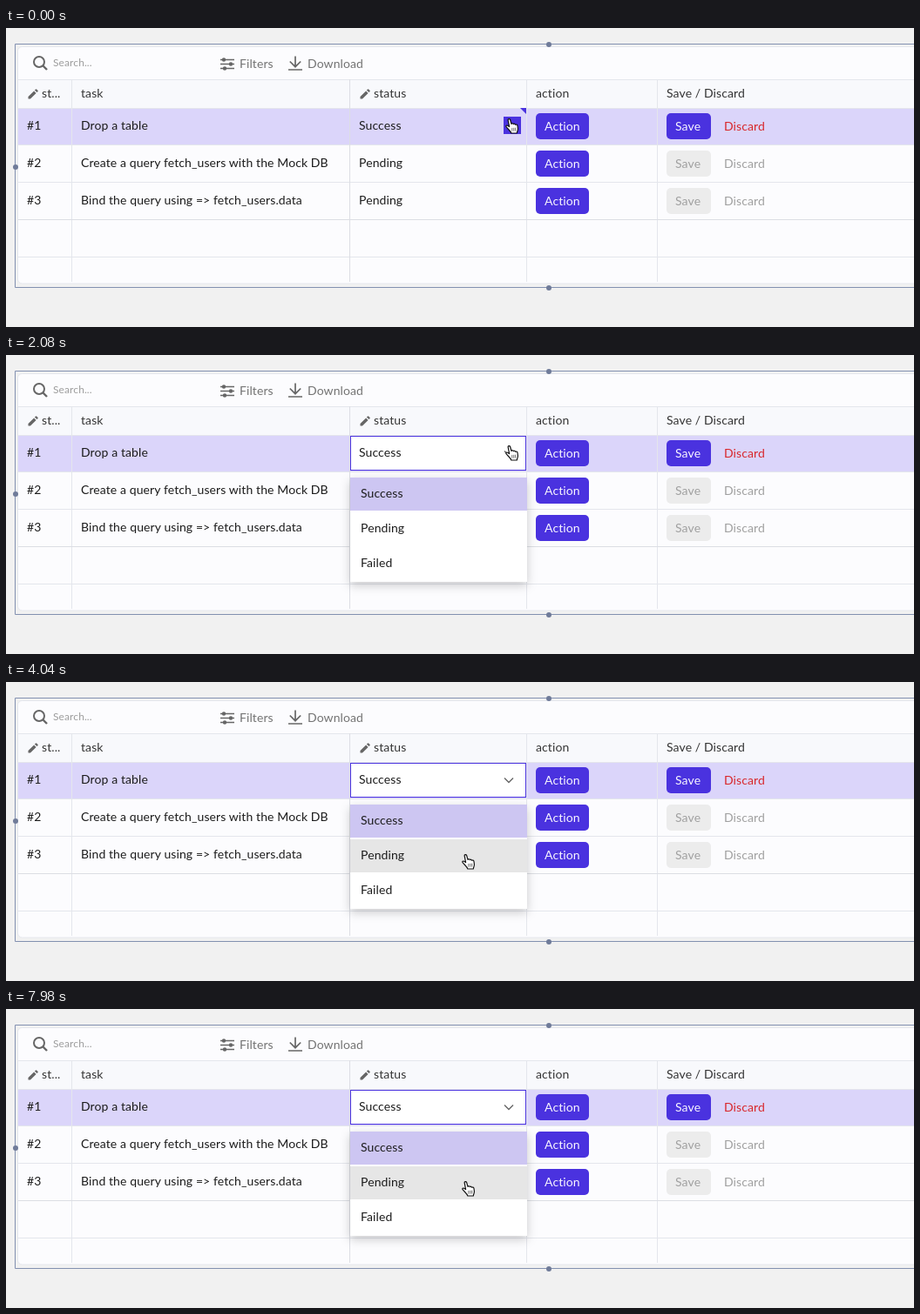
Write an HTML page that moves like this. It is 1042x344 px and loops after 8 s.

```html
<!DOCTYPE html>
<html lang="en">
<head>
<meta charset="utf-8">
<title>Editable table</title>
<style>
  html, body { margin: 0; width: 100%; height: 100%; overflow: hidden; background: #f1f1f1; }
  svg { display: block; width: 1042px; height: 344px; }
  text { font: 14px Lato, "Open Sans", sans-serif; letter-spacing: .1px; fill: #1c1c1c; }
  .head text { fill: #343434; }
  .tools text { fill: #737373; }
  .tools .hint { font-size: 12px; fill: #9c9c9c; }
  .icon { fill: none; stroke: #666; stroke-width: 1.7; }
  .solid { fill: #666; }
  .grid { fill: none; stroke: #e4e6ec; }
  .btn { fill: #4a32df; }
  .label { fill: #f8f6ff; }
  .discard { fill: #d8282c; }
  .off .btn { fill: #ececec; }
  .off text { fill: #a0a0a0; }
  .menu { animation: fade 8s infinite linear; }
  .menu .box { fill: #fff; filter: drop-shadow(0 4px 6px #0003); }
  .edit { animation: edit 8s infinite step-end; }
  .pen { animation: pen 8s infinite step-end; }
  .hover { animation: hover 8s infinite step-end; }
  .hand { animation: move 8s infinite linear; }

  @keyframes pen { 0% { opacity: 1; } 12.75%, 100% { opacity: 0; } }
  @keyframes edit { 0% { opacity: 0; } 12.75%, 100% { opacity: 1; } }
  @keyframes fade { 0%, 13% { opacity: 0; } 16.25%, 100% { opacity: 1; } }
  @keyframes hover { 0% { opacity: 0; } 36.4%, 100% { opacity: 1; } }
  @keyframes move {
    0%, 31% { transform: translate(573px, 104px); animation-timing-function: cubic-bezier(.4, 0, .8, .85); }
    37% { transform: translate(537px, 182px); animation-timing-function: cubic-bezier(.2, .6, .5, 1); }
    41%, 100% { transform: translate(523px, 198px); }
  }
</style>
</head>
<body>
<svg viewBox="0 0 1042 344">
  <defs>
    <path id="pencil" class="solid" d="M0 11.5V9L6.6 2.4 9.1 4.9 2.5 11.5ZM7.4 1.6 8.6.4Q9.1 0 9.6.4L11.1 1.9Q11.5 2.4 11.1 2.9L9.9 4.1Z"/>
    <g id="action">
      <rect class="btn" x="608" y="98" width="61" height="30" rx="5"/>
      <text class="label" x="618" y="118">Action</text>
    </g>
  </defs>

  <rect width="1042" height="344" fill="#f1f1f1"/>
  <rect x="13.5" y="21.5" width="1040" height="272.5" rx="5" fill="#fcfcfe" stroke="#e6e8ee"/>
  <rect x="14" y="59" width="1028" height="33" fill="#f8f9fc"/>
  <rect x="14" y="92" width="1028" height="42" fill="#dbd5fa"/>
  <path class="grid" d="M14 59.5H1042M14 92.5H1042M14 134.5H1042M14 177.5H1042M14 263.5H1042M75.5 59V292M597.5 59V292M747.5 59V292"/>
  <path class="grid" d="M14 220.5H1042M394.5 59V292" style="stroke:#dcdee4"/>

  <path d="M1042 18.5H10.5V298.5H1042" fill="none" stroke="#8290b0"/>
  <g fill="#6f7b99">
    <circle cx="623" cy="19" r="3"/>
    <circle cx="11" cy="160" r="3"/>
    <circle cx="623" cy="299" r="3"/>
  </g>

  <g class="tools">
    <path class="icon" d="M42.5 43.5 47 48" style="stroke-width:2.4"/>
    <circle class="icon" cx="38" cy="39" r="6" style="stroke-width:2"/>
    <text class="hint" x="54" y="44">Search...</text>
    <path class="icon" d="M246 36.5H262M246 41.5H262M246 46.5H262"/>
    <g class="solid">
      <circle cx="250" cy="36.5" r="2.2"/>
      <circle cx="258" cy="41.5" r="2.2"/>
      <circle cx="251" cy="46.5" r="2.2"/>
    </g>
    <text x="268" y="46">Filters</text>
    <path class="icon" d="M332 32.5V44M325.8 38.5 332 44.7 338.2 38.5M324 48H340"/>
    <text x="346" y="46">Download</text>
  </g>

  <g class="head">
    <use href="#pencil" x="25.5" y="70"/>
    <text x="41" y="80">st...</text>
    <text x="86" y="80">task</text>
    <use href="#pencil" x="406.5" y="70"/>
    <text x="422" y="80">status</text>
    <text x="608" y="80">action</text>
    <text x="758" y="80">Save / Discard</text>
  </g>

  <text x="24" y="117">#1</text>
  <text x="86" y="117">Drop a table</text>
  <text x="24" y="160">#2</text>
  <text x="86" y="160">Create a query fetch_users with the Mock DB</text>
  <text x="405" y="160">Pending</text>
  <text x="24" y="203">#3</text>
  <text x="86" y="203">Bind the query using =&gt; fetch_users.data</text>
  <text x="405" y="203">Pending</text>

  <use href="#action"/>
  <use href="#action" y="43"/>
  <use href="#action" y="86"/>
  <rect class="btn" x="758" y="98" width="51" height="30" rx="5"/>
  <text class="label" x="768" y="118">Save</text>
  <text class="discard" x="824" y="118">Discard</text>
  <g class="off">
    <rect class="btn" x="758" y="141" width="51" height="30" rx="5"/>
    <text x="768" y="161">Save</text>
    <text x="824" y="161">Discard</text>
    <rect class="btn" x="758" y="184" width="51" height="30" rx="5"/>
    <text x="768" y="204">Save</text>
    <text x="824" y="204">Discard</text>
  </g>

  <g class="pen">
    <path class="btn" d="M590 92H597V99Z"/>
    <rect class="btn" x="571" y="102" width="20" height="20"/>
  </g>
  <g class="edit">
    <rect x="395.5" y="93.5" width="201" height="39" fill="#fff" stroke="#4a32df"/>
    <path class="icon" d="M572 110.5 577 115.5 582 110.5" style="stroke-width:1.4"/>
  </g>
  <text x="405" y="117">Success</text>

  <g class="menu">
    <rect class="box" x="395" y="141" width="203" height="120"/>
    <rect x="395" y="141" width="203" height="38" fill="#cdc6f2"/>
    <rect class="hover" x="395" y="181" width="203" height="38" fill="#e6e6e6"/>
    <text x="407" y="164">Success</text>
    <text x="407" y="204">Pending</text>
    <text x="407" y="244">Failed</text>
  </g>

  <g class="hand" stroke="#111" stroke-linejoin="round" stroke-linecap="round">
    <path fill="#fff" stroke-width="1.2" d="M3.2 2.2C2.8.6 5-.1 5.6 1.5L7 6.3C7.6 5.4 9 5.6 9.4 6.6 10 5.9 11.2 6.2 11.6 7.3 12.4 6.7 13.8 7 14 8.5L14.4 11.5C14.6 13.5 13.6 14.8 13.3 17H6.8C6.5 15 3.5 12.6 1.2 9.9.2 8.6 1.6 7.4 3 8.4L4.6 9.6Z"/>
    <path fill="none" stroke-width=".6" d="M7.8 11.3V14.3M9.8 11.2V14.3M11.7 11.1V14.2"/>
  </g>
</svg>
</body>
</html>
```
